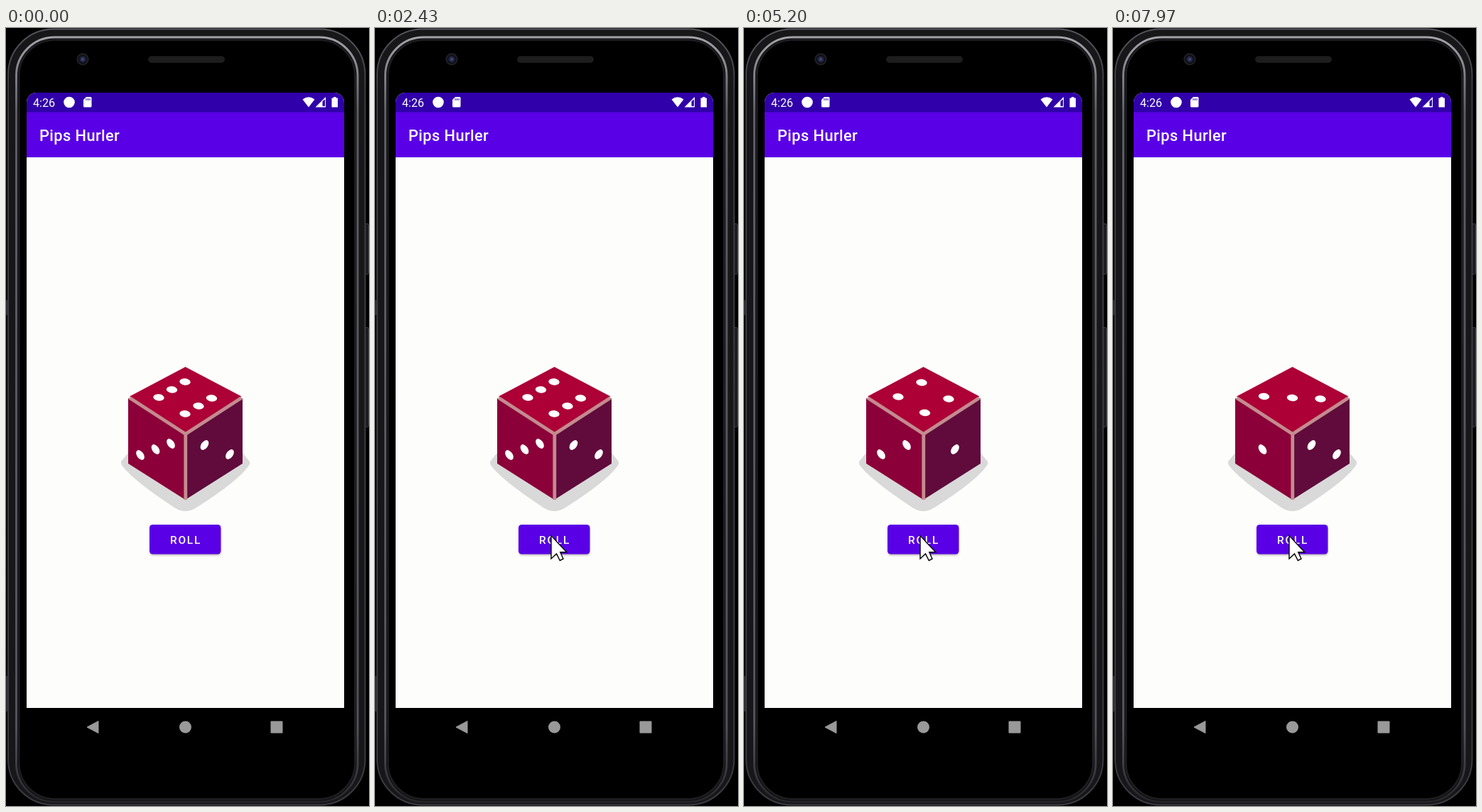
Recreate the animation shown at these times as an HTML page. Size 511 by 1095 pixels, loop 8000 ms.

```html
<!DOCTYPE html>
<html lang="en">
<head>
<meta charset="utf-8">
<title>Pips Hurler</title>
<style>
  html, body { margin: 0; width: 100%; height: 100%; overflow: hidden; background: #000; }
  svg { display: block; width: 511px; height: 1095px; }
  text { font-family: Roboto, sans-serif; fill: #fff; }
</style>
</head>
<body>
<svg viewBox="0 0 511 1095">
  <defs>
    <linearGradient id="shine" x1="0" x2="0" y1="0" y2="1">
      <stop offset="0" stop-color="#a2a2a8"/>
      <stop offset=".04" stop-color="#85858d"/>
      <stop offset=".1" stop-color="#5c5c66"/>
      <stop offset=".9" stop-color="#52525c"/>
      <stop offset=".96" stop-color="#3a3a40"/>
      <stop offset="1" stop-color="#242428"/>
    </linearGradient>
    <linearGradient id="edge" x1="0" x2="0" y1="0" y2="1">
      <stop offset="0" stop-color="#55555b"/>
      <stop offset=".08" stop-color="#3c3c43"/>
      <stop offset="1" stop-color="#3a3a40"/>
    </linearGradient>
    <radialGradient id="lens">
      <stop offset="0" stop-color="#46508a"/>
      <stop offset=".4" stop-color="#20243f"/>
      <stop offset=".65" stop-color="#0d0d14"/>
      <stop offset="1" stop-color="#29292f"/>
    </radialGradient>
    <filter id="soft" x="-20%" y="-40%" width="140%" height="190%">
      <feGaussianBlur stdDeviation="1.5"/>
    </filter>
    <clipPath id="screen">
      <path d="M29 957V105A14 14 0 0 1 43 91H462A14 14 0 0 1 476 105V957Z"/>
    </clipPath>
  </defs>

  <rect width="511" height="1095" fill="#000"/>

  <!-- phone body -->
  <g fill="#1b1b1f" stroke="#3c3c42">
    <rect x="504" y="275.500" width="6.500" height="71" rx="2"/>
    <rect x="504" y="421.500" width="6.500" height="140" rx="2"/>
  </g>
  <g fill="#2b2b30">
    <rect x="0" y="383" width="2" height="21"/>
    <rect x="0" y="912" width="2" height="50"/>
  </g>
  <rect x="3" y="1.500" width="502.500" height="1092" rx="64" fill="#17171a" stroke="url(#edge)" stroke-width="2"/>
  <rect x="14.500" y="13" width="480.500" height="1076" rx="54" fill="#000" stroke="url(#shine)" stroke-width="3"/>
  <rect x="18" y="16.500" width="473.500" height="1069" rx="51" fill="none" stroke="#1d1d21" stroke-width="3"/>
  <circle cx="108" cy="44" r="8.500" fill="url(#lens)"/>
  <rect x="200" y="39.500" width="108" height="9.500" rx="4.700" fill="#1d1d1e"/>

  <!-- screen -->
  <g clip-path="url(#screen)">
    <rect x="29" y="91" width="447" height="866" fill="#fdfdfc"/>
    <rect x="29" y="91" width="447" height="28" fill="#3000aa"/>
    <rect x="29" y="118.500" width="447" height="63.500" fill="#5a00e6"/>
  </g>
  <text x="38" y="110.700" font-size="16.200">4:26</text>
  <text x="47" y="159" font-size="21.800" font-weight="500" letter-spacing=".4">Pips Hurler</text>
  <g fill="#fff">
    <circle cx="89" cy="104.500" r="7.800"/>
    <path d="M113 97H119Q120.500 97 120.500 98.500V110Q120.500 111.500 119 111.500H110.500Q109 111.500 109 110V101Z"/>
    <path d="M417.500 100.500Q426 94 434.500 100.500L426 111.500Z"/>
    <path d="M450 97V111.500H435.500Z"/>
    <path d="M461 97H464.500V98.500H467V111.500H458.500V98.500H461Z"/>
  </g>
  <path d="M113 99V102M115.500 99V102M118 99V102M446 103.500V109.500H448.500V101Z" stroke="#3000aa" fill="#3000aa"/>

  <!-- navigation -->
  <g fill="#999">
    <path d="M114 984L130 975.500V992.500Z" stroke="#999" stroke-linejoin="round"/>
    <circle cx="252.500" cy="984" r="8.500"/>
    <rect x="372.500" y="975.500" width="17" height="17" rx="1"/>
  </g>

  <!-- die -->
  <path d="M172 598L163 609Q160 612 165 618Q181 638 237 675Q252.500 685 268 675Q325 639 341 617Q345 612 342 609L333 598L252.500 646Z" fill="#d9d9d9"/>
  <path d="M252.500 477L331.500 518.500L252.500 571L174 518.500Z" fill="#ac0037"/>
  <path d="M172 521L252.500 571V664L172 613Z" fill="#8b0038"/>
  <path d="M333 521L252.500 571V664L333 613Z" fill="#600b3b"/>
  <path d="M174 520.500L252.800 571.500L331.500 520.500M252.800 571.500V664" fill="none" stroke="#c48b8f" stroke-width="4.800"/>
  <g id="pips" fill="#fff"></g>

  <!-- button -->
  <rect id="shade" x="203" y="702" width="99" height="40" rx="4" filter="url(#soft)"/>
  <rect id="button" x="202" y="699" width="100.500" height="41.500" rx="4.500"/>
  <text x="231" y="726" font-size="15.400" font-weight="500" letter-spacing="1.800">ROLL</text>

  <path id="cursor" d="M0 0V32.500L7.500 25.500L12.300 35L17 32.700L12.800 23.300H21.800Z" fill="#fff" stroke="#000" stroke-width="1.400"/>
</svg>
<script>
  const LOOP = 8000;
  const PRESSES = [2900, 4220, 7200];
  const FADE = 550;
  const $ = id => document.getElementById(id);

  const RIGHT_TWO = [[279.5, 587], [315, 600]];
  const ROLLS = {
    six: {
      top: [[215, 520], [233.5, 509], [252, 498], [252, 543], [271, 532], [289.5, 521]],
      left: [[189, 601], [210.5, 593], [232, 585]],
      right: RIGHT_TWO
    },
    four: {
      top: [[250, 499], [217, 519], [288, 522], [254.5, 541.5]],
      left: [[193, 600], [229, 587]],
      right: [[297, 593]]
    },
    three: {
      top: [[212.5, 518.5], [252.5, 520.5], [292, 522]],
      left: [[210.5, 593]],
      right: RIGHT_TWO
    }
  };
  const PIP_SHAPES = { top: [7.7, 4.7, 5], left: [4.7, 7.7, -35], right: [4.7, 7.7, 35] };

  const pipMarkup = roll => Object.entries(roll).map(([face, points]) => {
    const [rx, ry, turn] = PIP_SHAPES[face];
    return points.map(([x, y]) =>
      `<ellipse rx="${rx}" ry="${ry}" transform="translate(${x} ${y}) rotate(${turn})"/>`).join("");
  }).join("");

  const clamp = v => Math.max(0, Math.min(1, v));
  const mix = (a, b, p) => a + (b - a) * p;
  const ease = p => p * p * (3 - 2 * p);

  function pressAmount(t) {
    return Math.max(...PRESSES.map(at => {
      const age = t - at;
      return Math.min(clamp((age + 80) / 80), clamp(1 - (age - 120) / (FADE - 120)));
    }));
  }

  function cursorAt(t) {
    if (t < 1630) {
      const p = clamp((t - 1350) / 280);
      return [mix(150, 196.5, p), mix(350, 418, p)];
    }
    const p = ease(clamp((t - 1630) / 770));
    return [mix(196.5, 248, p), mix(418, 714.5, p)];
  }

  let shown;
  function draw(t) {
    const roll = t < PRESSES[0] ? "six" : t < PRESSES[2] ? "four" : "three";
    if (roll !== shown) {
      $("pips").innerHTML = pipMarkup(ROLLS[roll]);
      shown = roll;
    }
    const press = pressAmount(t);
    $("button").setAttribute("fill", `rgb(${mix(90, 106, press)},${mix(0, 4, press)},${mix(230, 237, press)})`);
    $("shade").setAttribute("fill-opacity", mix(0.3, 0.42, press));
    $("cursor").setAttribute("transform", `translate(${cursorAt(t)})`);
    $("cursor").setAttribute("visibility", t < 1350 ? "hidden" : "visible");
  }

  const start = performance.now();
  function tick() {
    draw((performance.now() - start) % LOOP);
    requestAnimationFrame(tick);
  }
  tick();
</script>
</body>
</html>
```
